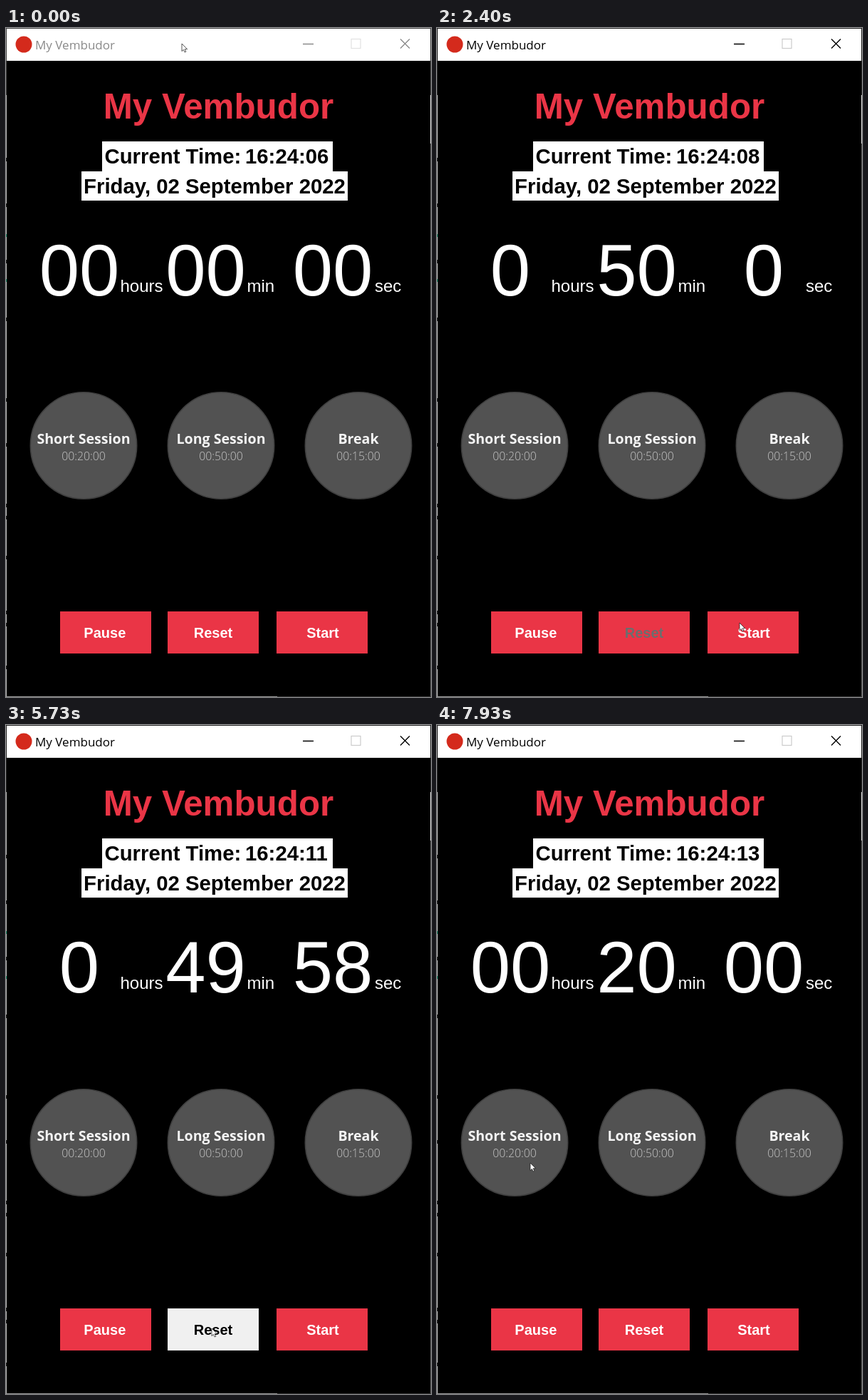
An HTML page for the animation above (8 s loop, 597 by 938 pixels).

```html
<!DOCTYPE html>
<html lang="en">
<head>
<meta charset="utf-8">
<title>My Vembudor</title>
<style>
  html, body { margin: 0; width: 100%; height: 100%; overflow: hidden; background: #000; }
  svg { display: block; width: 100%; height: 100%; }
  text { white-space: pre; }
  .sans { font-family: "Liberation Sans", Arial, sans-serif; }
  .open { font-family: "Open Sans", "Noto Sans", sans-serif; }
  .bold { font-weight: 700; }
  .mid { text-anchor: middle; }
</style>
</head>
<body>
<svg id="stage" viewBox="0 0 597 938" xmlns="http://www.w3.org/2000/svg"></svg>
<script>
const LOOP = 8000, FPS = 15;
const RED = '#ea3546', FACE = '#f0f0f0';
const stage = document.getElementById('stage');

function add(tag, attrs, content) {
  const el = document.createElementNS('http://www.w3.org/2000/svg', tag);
  for (const name in attrs) el.setAttribute(name, attrs[name]);
  if (content !== undefined) el.textContent = content;
  stage.appendChild(el);
  return el;
}
const rect = (x, y, width, height, fill) => add('rect', { x, y, width, height, fill });
const label = (str, x, y, size, fill, cls) =>
  add('text', { x, y, 'font-size': size, fill, class: cls }, str);

// Window frame and the desktop showing at its edges
rect(0, 0, 597, 938, '#000');
rect(0, 94, 1, 844, '#b9b9b9');
rect(596, 94, 1, 68, '#e4e4e4');
rect(596, 162, 1, 776, '#555');
rect(0, 937, 381, 1, '#9a9a9a');
rect(381, 937, 216, 1, '#333');
for (const y of [182, 246, 325, 406, 519, 582, 667, 684, 740, 817, 834, 894]) rect(0, y, 1, 5, '#222');
for (const y of [289, 352]) rect(0, y, 1, 4, '#2a9d78');

// Title bar
rect(1, 1, 595, 45, '#fff');
const edge = add('path', { d: 'M0 .5H597M.5 0V94M596.5 0V94', fill: 'none' });
add('circle', { cx: 25, cy: 23, r: 11.5, fill: '#d42a1c' });
const caption = label('My Vembudor', 41, 30, 17, '#000', 'open');
const controls = add('path', { d: 'M417 22.5H432M554 15.5L567 28.5M567 15.5L554 28.5', fill: 'none', 'stroke-width': 1.4 });
const maximise = add('rect', { x: 485, y: 15.5, width: 13, height: 13, fill: 'none', 'stroke-width': 1.2 });

// Heading and clock
label('My Vembudor', 298.5, 126.5, 49.33, RED, 'sans bold mid');
rect(135, 159, 324, 42, '#fff');
rect(106, 201, 374, 41, '#fff');
label('Current Time:', 138.5, 190, 29.33, '#000', 'sans bold');
const clock = label('', 336, 190, 29.33, '#000', 'sans bold');
label('Friday, 02 September 2022', 293, 231.5, 29.33, '#000', 'sans bold mid');

// Countdown
const digits = [103, 280.5, 459].map(x => label('', x, 375, 101.3, '#fff', 'sans mid'));
label('hours', 160.5, 369.5, 24, '#fff', 'sans');
label('min', 338.5, 369.5, 24, '#fff', 'sans');
label('sec', 518, 369.5, 24, '#fff', 'sans');

const rounds = {}, buttons = {};

function roundButton(name, time, cx) {
  rounds[name] = rect(cx - 97, 491, 192, 192, '#000');
  add('circle', { cx, cy: 585.5, r: 74.7, fill: '#525252', stroke: '#404040', 'stroke-width': 1.6 });
  label(name, cx, 583, 19.6, '#f4f4f4', 'open bold mid');
  label(time, cx, 606, 15.8, '#c4c4c4', 'open mid').setAttribute('font-weight', 300);
}
roundButton('Short Session', '00:20:00', 109);
roundButton('Long Session', '00:50:00', 302);
roundButton('Break', '00:15:00', 495);

function flatButton(name, x, cx) {
  const box = rect(x, 818, 128, 59, RED);
  buttons[name] = { box, text: label(name, cx, 854.7, 20, '#fff', 'sans bold mid') };
}
flatButton('Pause', 76, 138.8);
flatButton('Reset', 227, 291);
flatButton('Start', 380, 445);

const cursor = add('path', {
  d: 'M0 0V10.6L2.4 8.4L4 12L5.8 11.2L4.2 7.7H7.6Z',
  fill: '#fff', stroke: '#111', 'stroke-width': 0.7
});

// Everything below is timed in steps of 1/15 s
const ACTIVE_AT = 14;
const ticks = [13, 28, 51, 66, 81, 96, 111];
const readings = [
  [0, '00 00 00'], [16, '00 50 00'], [36, '0 50 0'], [51, '0 49 59'],
  [66, '0 49 58'], [88, '00 00 00'], [101, '00 15 00'], [116, '00 20 00']
];
const presses = [
  ['Long Session', 14, 16], ['Start', 34, 36], ['Reset', 86, 88],
  ['Break', 100, 101], ['Short Session', 115, 116]
];
const track = [
  [0, 247, 22], [2, 247, 22], [13, 306, 598], [22, 306, 598], [23, 335, 595], [30, 425, 834],
  [47, 425, 834], [51, 333, 785], [60, 165, 870], [76, 165, 870], [77, 181, 867], [82, 289, 846],
  [91, 289, 846], [98, 503, 621], [105, 503, 621], [109, 290, 651], [112, 126, 614],
  [118, 126, 614], [119, 131, 614], [120, 131, 614]
];

// Slope of the cursor path at a point; zero beside a rest
function slope(i, axis) {
  const a = track[i - 1], b = track[i], c = track[i + 1];
  const still = (p, q) => p[1] === q[1] && p[2] === q[2];
  if (!a || !c || still(a, b) || still(b, c)) return 0;
  return (c[axis] - a[axis]) / (c[0] - a[0]);
}

function cursorAt(step) {
  let i = 0;
  while (i < track.length - 2 && track[i + 1][0] <= step) i++;
  const a = track[i], b = track[i + 1], span = b[0] - a[0];
  const u = Math.min(1, (step - a[0]) / span), v = 1 - u;
  return [1, 2].map(axis =>
    a[axis] * v * v * (1 + 2 * u) + b[axis] * u * u * (3 - 2 * u) +
    span * u * v * (v * slope(i, axis) - u * slope(i + 1, axis)));
}

function draw(ms) {
  const step = Math.floor(ms * FPS / 1000 + 0.06);
  const active = step >= ACTIVE_AT;
  const ink = active ? '#000' : '#8a8a8a';
  caption.setAttribute('fill', ink);
  controls.setAttribute('stroke', ink);
  maximise.setAttribute('stroke', active ? '#ccc' : '#e2e2e2');
  edge.setAttribute('stroke', active ? '#222' : '#444');

  const sec = 6 + ticks.filter(t => t <= step).length;
  clock.textContent = '16:24:' + String(sec).padStart(2, '0');
  const reading = readings.filter(r => r[0] <= step).pop()[1].split(' ');
  digits.forEach((d, i) => { d.textContent = reading[i]; });

  const press = presses.find(p => step >= p[1] && step < p[2]);
  const held = press && press[0];
  for (const name in rounds) rounds[name].setAttribute('fill', name === held ? FACE : '#000');
  for (const name in buttons) {
    const { box, text } = buttons[name];
    const disabled = name === 'Reset' && step >= 36 && step < 66;
    box.setAttribute('fill', name === held ? FACE : RED);
    text.setAttribute('fill', name === held ? '#000' : disabled ? '#6d6d6d' : '#fff');
  }

  const [x, y] = cursorAt(step).map(Math.round);
  cursor.setAttribute('transform', `translate(${x} ${y})`);
}

const start = performance.now();
function frame() {
  draw((performance.now() - start) % LOOP);
  requestAnimationFrame(frame);
}
draw(0);
requestAnimationFrame(frame);
</script>
</body>
</html>
```
